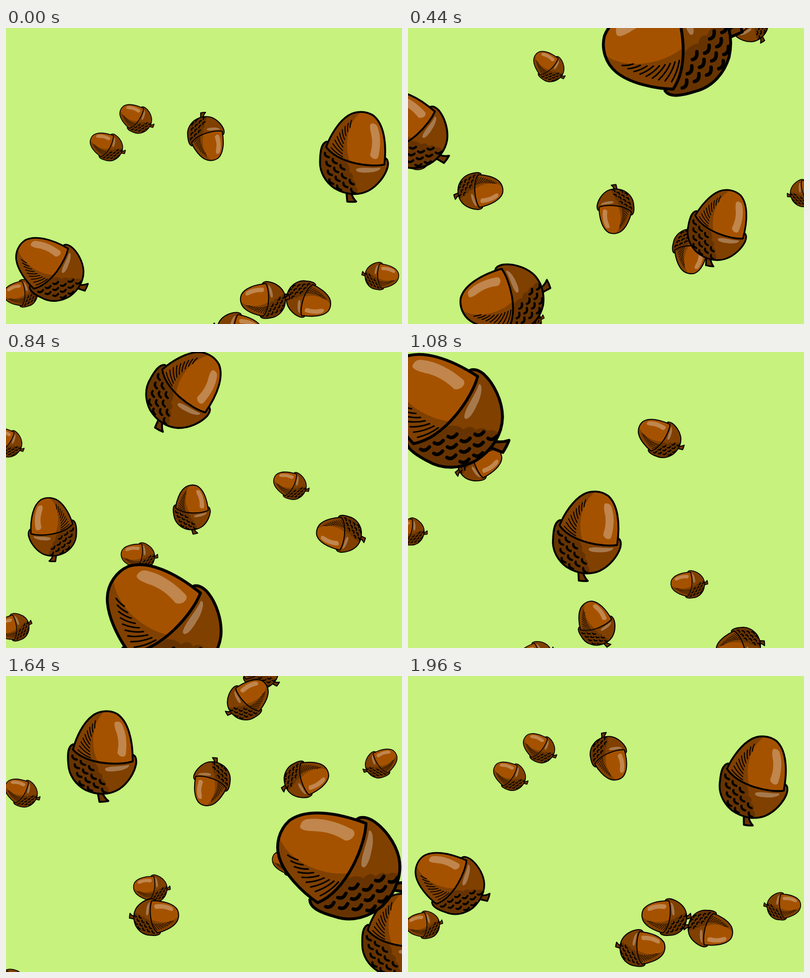
An HTML page for the animation above (2000 ms loop, 800 by 600 pixels).

```html
<!DOCTYPE html>
<html lang="en">
<head>
<meta charset="utf-8">
<title>Falling acorns</title>
<style>
  html, body { margin: 0; width: 100%; height: 100%; overflow: hidden; background: #c6f27d; }
  svg { display: block; width: 100vw; height: 100vh; }
</style>
</head>
<body>
<svg viewBox="0 0 800 600">
  <defs><g id="acorn" stroke="#000" stroke-width="3.8" stroke-linejoin="round" stroke-linecap="round"></g></defs>
  <g id="drops"></g>
</svg>
<script>
const STEP = 40, STEPS = 50, MIDDLE = 300;
const SMALL = 0.405, MEDIUM = 0.54, MID = 0.705, BROAD = 0.87, LARGE = 1, HUGE = 1.53;
const byId = id => document.getElementById(id);

// Small ticks in slanted rows, kept to the shaded part of the cap
function scales() {
  let d = '';
  for (let row = 0; row < 4; row++) {
    for (let col = 0; col < 4; col++) {
      const x = -57 + 17 * col + 5 * row;
      const y = 4 + 10.5 * col + 17.5 * row;
      const inside = Math.hypot(x / 70, y / 75) < 0.97 && x < 0.36 * y - 19;
      if (inside) d += `M${x - 4} ${y - 5}q0 7 9 8`;
    }
  }
  return d;
}

// Strokes fanning out along the shaded edge of the nut, shorter towards the tip
function hatching() {
  let d = '';
  for (let u = 0; u <= 1; u += 1 / 9) {
    const w = 1 - u;
    const x = -50 * w * w - 76 * u * w - 9 * u * u;
    const y = -13 * w * w - 100 * u * w - 79 * u * u;
    const angle = (32 + 70 * u) * Math.PI / 180, length = 30 - 17 * u;
    const dx = length * Math.cos(angle), dy = length * Math.sin(angle);
    d += `M${x} ${y}q${dx / 2 - dy * 0.1} ${dy / 2 + dx * 0.1} ${dx} ${dy}`;
  }
  return d;
}

const shape = (d, fill) => `<path d="${d}" fill="${fill}" stroke="none"/>`;
const line = (d, width = 3.8) => `<path d="${d}" fill="none" stroke-width="${width}"/>`;

const stem = 'M-9 72L-5 92Q5 92 13 90Q5 84 1 74Z';
const capSide = 'M-60-24C-70-20-71-5-69 15C-68 40-52 58-34 68';
const cap = capSide + 'C-10 79 15 78 34 66C52 54 65 32 68 14C69 4 66-2 62-4';
const capShade = capSide + 'C-18 76 0 77 14 75Q14 62 8 60Q10 50 0 46Q4 36-8 32Q-6 22-16 12Z';
const capShine = 'M6 24C15 18 40 20 53 16C58 20 42 28 28 29C18 31 2 31 6 24Z';
const nutSide = 'M-60-13C-54-38-40-68-22-82';
const nut = nutSide + 'C-8-93 12-95 28-87C50-73 61-36 61 9C35 18-30 18-60-13Z';
const nutShade = nutSide + 'C-14-88-8-90 2-91C-22-68-26-20-8 13C-30 12-46 0-60-13Z';
const nutShine = 'M28-71C20-72 24-58 28-48C33-32 32-20 30-8C32 0 46 4 47-6C50-30 46-50 40-62C37-70 33-71 28-71Z';

byId('acorn').innerHTML =
  shape(stem, '#6b3500') + line(stem) +
  shape(cap, '#804000') + shape(capShade, '#663300') + shape(capShine, '#a6794d') +
  line(scales(), 4.6) + line(cap) +
  shape(nut, '#a55200') + shape(nutShade, '#804000') + line(hatching(), 2) +
  shape(nutShine, '#c0864d') + line(nut);

const drops = [];

// Each lane gives x and the step at which an acorn passes mid-height, and its sideways drift.
// Faster acorns spin faster; angle is the pose at mid-height.
function fall(size, speed, angle, turn, lanes, flip = 1) {
  const spin = turn * (1.7 + 0.055 * speed);
  for (const [x, step, drift = 0] of lanes) {
    const node = document.createElementNS('http://www.w3.org/2000/svg', 'use');
    node.setAttribute('href', '#acorn');
    byId('drops').append(node);
    drops.push({ node, x, step, drift, speed, size, flip, angle: angle * flip, spin: spin * flip });
  }
}
const fallMirrored = (...args) => fall(...args, -1);

fall(SMALL, 30, -76, -1, [[16, 12.4], [2, 24.9]]);
fall(SMALL, 33.5, -76, -1, [[275, 17.6, -1.6], [575, 21.9, -1.3], [845, 25, -2],
  [290, 37.1, 1.2], [577, 38.7, -1], [33, 42.9]]);
fall(SMALL, 37.5, -76, -1, [[202, 1.6, -2], [257, 3.1, -2.3], [16, 32.4, -1]]);
fallMirrored(SMALL, 33.5, -76, -1, [[803, 10]]);
fallMirrored(SMALL, 36.2, -76, -1, [[756, 44.4]]);

fall(MEDIUM, 39, -4, -1, [[375, 20.5, 0.8]]);
fall(MEDIUM, 38, 75, 1, [[141, 10.2, 1], [604, 43.4, 0.5]]);
fall(MEDIUM, 45, 70, 1, [[143, 28.7, 1.3]]);
fallMirrored(MEDIUM, 38, 70, 1, [[679, 19.2, -1]]);
fall(MEDIUM, 61, -176, -1, [[417, 9.9, 1.7], [417, 42.4, 1.7]]);
fallMirrored(MEDIUM, 57, -176, -1, [[403, 1.4, -1.6], [576, 8.4, -1.6]]);
fall(MEDIUM, 62.8, -75, -1, [[515, 29, 2], [518, 46, 1.4]]);
fallMirrored(MEDIUM, 62.8, -75, -1, [[306, 38, -2.3], [478, 45, -2.2]]);

fallMirrored(MID, 60, -2, 1, [[93, 20], [437, 34.3]]);
fall(BROAD, 70, 24, -1, [[626, 9.5, 1]]);
fall(BROAD, 70, -75, 1, [[84, 47.3, 3]]);

fall(LARGE, 48.8, 3, -1, [[708, 0.8, 4]]);
fall(LARGE, 48.8, 15, -1, [[362, 25.5, 1]]);
fall(LARGE, 60.7, -56, -1, [[7, 12.5]]);
fall(LARGE, 60.7, -86, -1, [[198, 6.9]]);
fall(LARGE, 72, -10, -1, [[195, 42.9]]);
fall(LARGE, 72, -166, -1, [[157, 33]]);
fall(LARGE, 85, -28, -1, [[694, 31.8]]);
fall(LARGE, 85, 89, 1, [[50, 31.5]]);
fall(LARGE, 64.6, 23, -1, [[785, 37.4, 1.3]]);

fall(HUGE, 90, -122, -1, [[536, 14]]);
fall(HUGE, 90, -32, -1, [[323, 18.2]]);
fall(HUGE, 90, -70, -1, [[78, 29]]);
fall(HUGE, 90, -63, -1, [[681, 40.1]]);

function render(ms) {
  const now = Math.floor(ms / STEP) % STEPS, half = STEPS / 2;
  for (const d of drops) {
    const k = (now - d.step + half + STEPS) % STEPS - half;
    const x = d.x + d.drift * k, y = MIDDLE + d.speed * k;
    d.node.setAttribute('transform',
      `translate(${x} ${y}) rotate(${d.angle + d.spin * k}) scale(${d.size * d.flip} ${d.size})`);
  }
}

const start = performance.now();
function tick() {
  render(performance.now() - start);
  requestAnimationFrame(tick);
}
tick();
</script>
</body>
</html>
```
